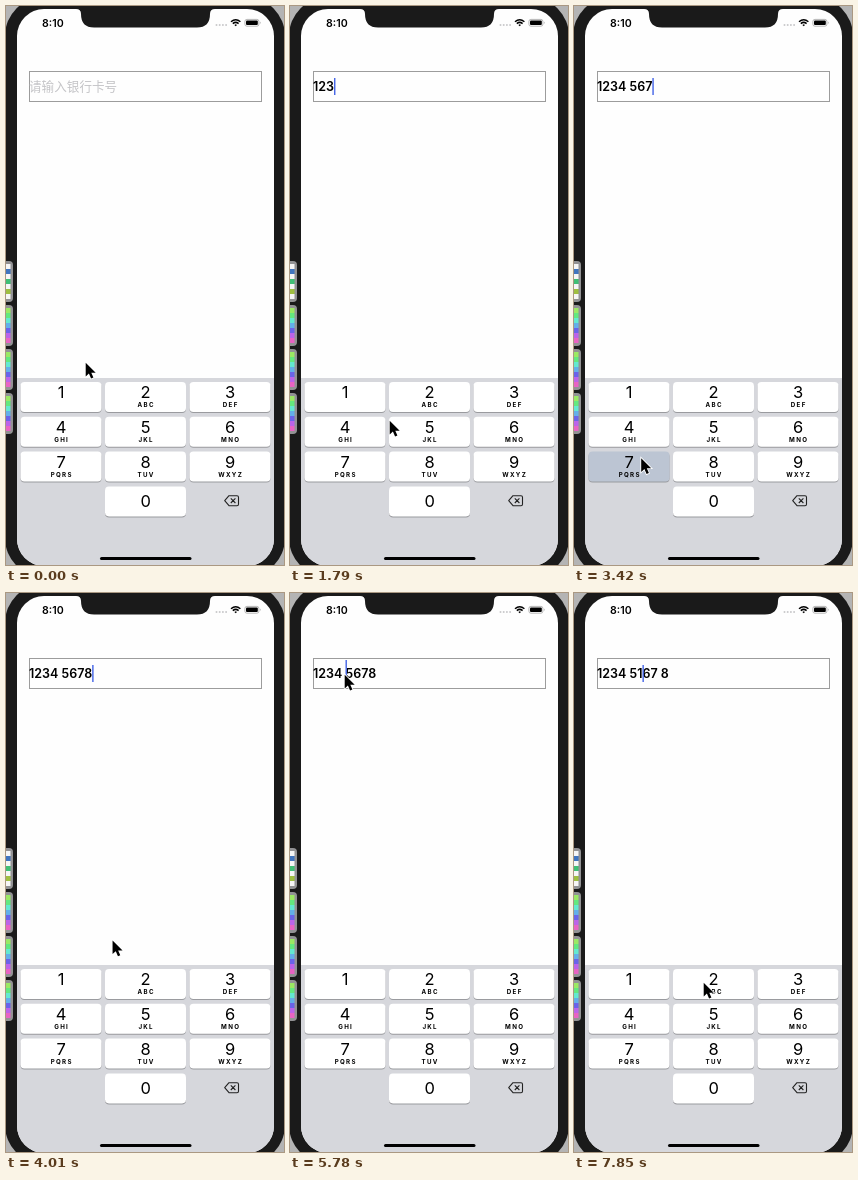
Animation, 278 px wide and 559 px high, one loop 7.99 s. Source, as an HTML page:

```html
<!DOCTYPE html>
<html lang="zh">
<head>
<meta charset="utf-8">
<style>
html, body { margin: 0; height: 100%; overflow: hidden; background: #b4b4b4; }
svg { display: block; width: 100vw; height: 100vh; font-family: Inter, "Noto Sans CJK SC", "Noto Sans CJK", sans-serif; }
.digit { font-size: 16.5px; text-anchor: middle; }
.letters { font-size: 6.2px; font-weight: 700; letter-spacing: 1.3px; text-anchor: middle; }
</style>
</head>
<body>
<svg viewBox="0 0 278 559">
  <defs><clipPath id="screen"><rect x="11" y="3" width="257" height="557" rx="27"/></clipPath></defs>
  <rect x="-1" y="-9" width="280" height="580" rx="39" fill="#1a1a1a"/>
  <g id="dock"></g>
  <g clip-path="url(#screen)">
    <rect width="278" height="559" fill="#fefefe"/>
    <rect y="372" width="278" height="187" fill="#d6d7dc"/>
    <path d="M70 2V3Q75 3 75 8Q75 21.500 88 21.500H191Q204 21.500 204 8Q204 3 209 3V2Z" fill="#1a1a1a"/>
  </g>
  <text x="36" y="20.700" font-size="10.600" font-weight="600">8:10</text>
  <path d="M210.500 19h10" stroke="#c9c9cb" stroke-width="2" stroke-linecap="round" stroke-dasharray="0 3.200"/>
  <g fill="none" stroke="#000" stroke-width="1.500">
    <path d="M225 15.700Q229.700 11.700 234.400 15.700M226.800 17.600Q229.700 15.200 232.600 17.600"/>
    <path d="M228.400 18.900L229.700 18.200L231 18.900L229.700 20.200Z" fill="#000" stroke="none"/>
  </g>
  <rect x="238.900" y="13.400" width="14" height="6.800" rx="2" fill="none" stroke="#999" stroke-width=".7"/>
  <rect x="240" y="14.500" width="11.800" height="4.600" rx="1"/>
  <path d="M254 15.500q1.300 1.300 0 2.600z" fill="#999"/>
  <rect x="23.500" y="65.500" width="232" height="30" fill="none" stroke="#9c9c9c"/>
  <text id="hint" x="23" y="85" font-size="12.600" fill="#c4c4c7">请输入银行卡号</text>
  <text id="field" x="23" y="85.200" font-size="12.500" font-weight="600" xml:space="preserve"></text>
  <rect id="caret" y="72" width="1.400" height="17" fill="#4263e6"/>
  <g id="keys"></g>
  <path d="M218.700 494.700L223 489.700H231Q232.500 489.700 232.500 491.200V498.200Q232.500 499.700 231 499.700H223ZM224.800 492.400l4.600 4.600m0-4.600l-4.600 4.600" fill="none" stroke="#222" stroke-width="1.100" stroke-linejoin="round"/>
  <rect x="94" y="551" width="91.500" height="3" rx="1.500"/>
  <path id="mouse" d="M.7.7V14.400L3.900 11.500L6.100 16.500L8.400 15.500L6.300 10.700H10.700Z" stroke="#fff" stroke-width="1.600" paint-order="stroke"/>
</svg>
<script>
const LOOP = 7990, STEP = 148.1;
const $ = id => document.getElementById(id);
function set(el, attrs) {
  for (const name in attrs) el.setAttribute(name, attrs[name]);
}
function make(parent, tag, attrs, text = '') {
  const el = document.createElementNS('http://www.w3.org/2000/svg', tag);
  set(el, attrs);
  el.textContent = text;
  return parent.appendChild(el);
}

// Striped tiles peeking out at the left edge
const rainbow = j => `hsl(${95 + j * 37} 75% 65%)`;
const sheet = j => j % 2 ? `hsl(${250 - j * 35} 50% 50%)` : '#f6f6f6';
for (let i = 0; i < 4; i++) {
  const y = 255 + i * 44;
  make($('dock'), 'rect', { x: -10, y, width: 17, height: 41, rx: 4, fill: '#929294' });
  for (let j = 0; j < 7; j++) {
    make($('dock'), 'rect', { x: 0, y: y + 3 + j * 5, width: 4.5, height: 5, fill: (i ? rainbow : sheet)(j) });
  }
}

// Number pad
const letters = ['', '', 'ABC', 'DEF', 'GHI', 'JKL', 'MNO', 'PQRS', 'TUV', 'WXYZ'];
const keys = letters.map((label, digit) => {
  const col = digit ? (digit - 1) % 3 : 1, row = digit ? Math.floor((digit - 1) / 3) : 3;
  const x = 14.5 + col * 84.5, y = 376 + row * 34.8, mid = x + 40.6;
  make($('keys'), 'rect', { x, y: y + 1, width: 81, height: 30, rx: 4, fill: '#9a9b9f' });
  const face = make($('keys'), 'rect', { x, y, width: 81, height: 30, rx: 4 });
  make($('keys'), 'text', { class: 'digit', x: mid, y: y + (digit ? 16.3 : 20.3) }, digit);
  make($('keys'), 'text', { class: 'letters', x: mid + .6, y: y + 25.3 }, label);
  return { x, y, face };
});

// The pointer visits key taps [step, digit] and free points [step, x, y]
const visits = [
  [3, 79, 356], [5, 1], [7, 2], [9, 3], [12, 99, 414], [13, 4], [15, 5], [17, 189, 415], [18, 6],
  [23, 7], [24, 8], [25, 117, 453], [32, 78, 81], [35, 83, 84], [39, 54, 81], [45, 57, 85],
  [49, 59, 412], [51, 1], [53, 129, 389]
];
const taps = visits.filter(v => v.length === 2);
const LIFT = 36, DROP = 44, SPLIT = 5;

function place([, a, b]) {
  return b === undefined ? [keys[a].x + 52, keys[a].y + 6] : [a, b];
}

function pointer(n) {
  const i = Math.max(1, visits.findIndex(v => v[0] >= n));
  const from = visits[i - 1], to = visits[i];
  const k = Math.max(0, (n - from[0]) / (to[0] - from[0]));
  const a = place(from), b = place(to);
  return a.map((v, j) => v + (b[j] - v) * k);
}

function caretShown(n) {
  const edits = [0, DROP, ...taps.map(t => t[0])].filter(s => s <= n);
  const idle = n - Math.max(...edits);
  return n > 0 && (idle < 5 || idle % 6 > 2);
}

function draw(n) {
  const [mx, my] = pointer(n);
  set($('mouse'), { transform: `translate(${mx} ${my})` });

  const typed = taps.filter(t => t[0] <= n).map(t => t[1]);
  let pos = typed.length;
  if (n >= LIFT) {
    const added = typed.splice(8);
    typed.splice(SPLIT, 0, ...added);
    pos = SPLIT + added.length;
  }
  const text = typed.join('').replace(/(\d{4})(?=\d)/g, '$1 ');
  $('field').textContent = text;
  set($('hint'), { visibility: text ? 'hidden' : 'visible' });

  const chars = pos + (pos > 4 ? 1 : 0);
  const lifted = n >= LIFT && n < DROP;
  const end = 23 + (chars ? $('field').getSubStringLength(0, chars) : .5);
  set($('caret'), {
    x: lifted ? mx + 1.5 : end, y: lifted ? my - 14 : 72,
    opacity: lifted || caretShown(n) ? 1 : 0
  });

  const down = taps.find(t => t[0] === n);
  keys.forEach((key, digit) => set(key.face, { fill: down && down[1] === digit ? '#bcc5d3' : '#fff' }));
}

const start = performance.now();
function tick() {
  draw(Math.floor((performance.now() - start) % LOOP / STEP));
  requestAnimationFrame(tick);
}
tick();
</script>
</body>
</html>
```
